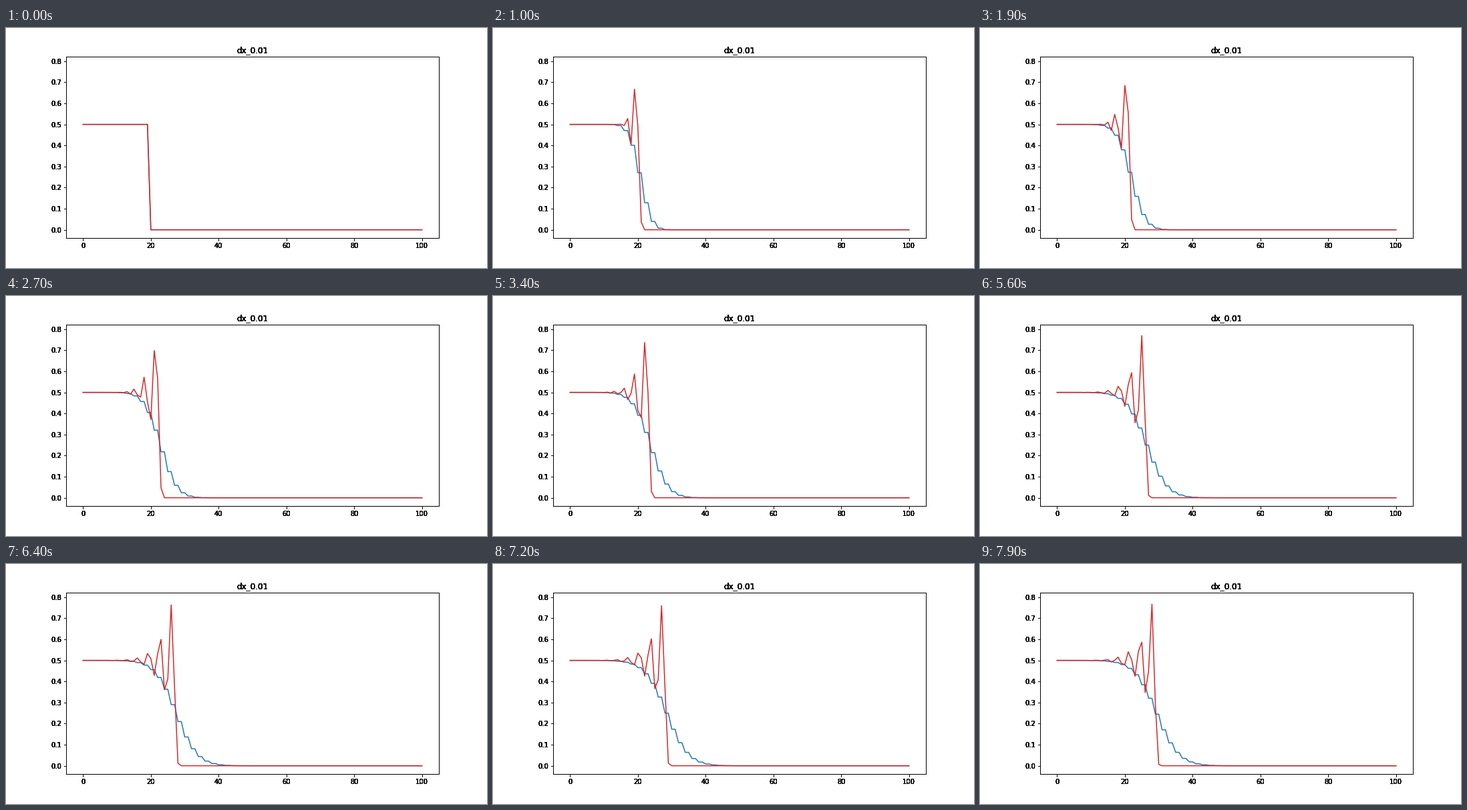
A matplotlib script that plays this animation: 720x360 px, repeating every 8000 ms.

```python
import numpy as np
import matplotlib.pyplot as plt
from matplotlib.animation import FuncAnimation

# Burgers' equation, step profile: Lax-Friedrichs against Lax-Wendroff
CELLS = 101
STEPS = 80
DX = 0.01
RATIO = 0.5  # dt / dx
OVERPRINT = 8  # repeated axes passes give heavy, nearly aliased lettering


def flux(u):
    return u ** 2 / 2


def lax_friedrichs(u):
    new = u.copy()
    f = flux(u)
    new[1:-1] = (u[2:] + u[:-2]) / 2 - RATIO / 2 * (f[2:] - f[:-2])
    return new


def lax_wendroff(u):
    new = u.copy()
    half = (u[1:] + u[:-1]) / 2 - RATIO / 2 * np.diff(flux(u))
    new[1:-1] -= RATIO * np.diff(flux(half))
    return new


def solve(scheme):
    states = [np.where(np.arange(CELLS) < 20, 0.5, 0.0)]
    for _ in range(STEPS - 1):
        states.append(scheme(states[-1]))
    return np.array(states)


def padded(low, high, margin=0.05):
    pad = margin * (high - low)
    return low - pad, high + pad


smooth = solve(lax_friedrichs)
sharp = solve(lax_wendroff)
x = np.arange(CELLS)
x_lim = padded(0, CELLS - 1)
y_lim = padded(0, sharp.max())

fig = plt.figure(figsize=(10, 5), dpi=72, facecolor="white")


def add_layer(first):
    ax = fig.add_axes([0.125, 0.125, 0.775, 0.755])
    ax.patch.set_visible(first)
    ax.set_xticks(range(0, 101, 20))
    ax.set_yticks(np.arange(9) / 10)
    ax.set(xlim=x_lim, ylim=y_lim)
    ax.set_title(f"dx_{DX}")
    return ax


layers = [add_layer(i == 0) for i in range(OVERPRINT)]
blue, = layers[0].plot(x, smooth[0], color="tab:blue", lw=1.5)
red, = layers[0].plot(x, sharp[0], color="tab:red", lw=1.5)
layers[0].set(xlim=x_lim, ylim=y_lim)


def update(n):
    blue.set_ydata(smooth[n])
    red.set_ydata(sharp[n])
    return blue, red


anim = FuncAnimation(fig, update, frames=STEPS, interval=100, repeat=True)
plt.show()
```
